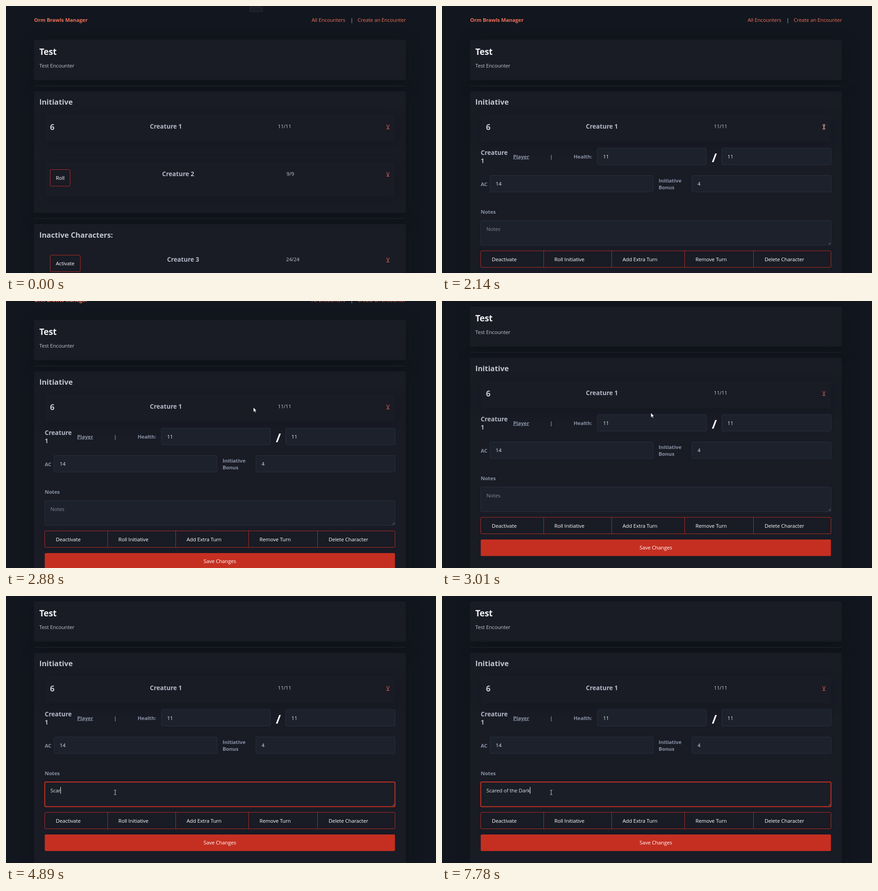
Animation, 949 px wide and 590 px high, one loop 8000 ms. Source, as an HTML page:

```html
<!DOCTYPE html>
<html lang="en">
<head>
<meta charset="utf-8">
<title>Encounter</title>
<style>
  html, body { margin: 0; height: 100%; overflow: hidden; background: #12161e; }
  svg { display: block; width: 949px; height: 590px; }
  text { font: 11.4px "Open Sans", "Noto Sans", sans-serif; letter-spacing: -.01em; fill: #c2c7d0; white-space: pre; }
  .h1, .h2, .h4, .six, .brand, .label, .slash { font-weight: 700; }
  .h1 { font-size: 19.2px; fill: #f0f1f3; }
  .h2 { font-size: 16.3px; letter-spacing: 0; }
  .h4 { font-size: 13.6px; letter-spacing: 0; fill: #b4b9c7; }
  .six { font-size: 17.6px; }
  .brand, .link { fill: #f1705a; }
  .label { fill: #8891a4; }
  .slash { font-size: 27px; fill: #fff; }
  .value { fill: #e0e3e7; }
  .white { fill: #fff; }
  .hint { fill: #838a9c; }
  .under { text-decoration: underline; text-underline-offset: 2px; }
  .mid { text-anchor: middle; }
  .card { fill: #191b25; filter: drop-shadow(3px 7px 16px rgba(7, 8, 12, .28)); }
  .inner { fill: #191b25; filter: drop-shadow(2px 6px 12px rgba(7, 8, 12, .18)); }
  .rule { fill: #202632; }
  .field { fill: #1c212c; stroke: #2a3140; }
  .focus { fill: #1a1e27; stroke: #c52f21; stroke-width: 2; }
  .outline { fill: none; stroke: #b32d22; }
  .save { fill: #c52f21; }
</style>
</head>
<body>
<svg viewBox="0 0 949 590">
  <g id="page"></g>
  <g id="tab"><rect x="537" width="30.5" height="14" fill="#1d2028"/><rect x="541" y="5" width="22" height="4" fill="#191c24"/></g>
  <path id="arrow" d="M0 0V10.3L2.4 8.2 4 11.8 5.6 11.1 4.1 7.6H7.2Z" fill="#fff" stroke="#0b0d12" stroke-width=".6"/>
  <path id="beam" d="M-2.5 -5H-.5L0 -4.5.5 -5H2.5M0 -4.5V4.5M-2.5 5H-.5L0 4.5.5 5H2.5" fill="none" stroke="#d5d8df"/>
</svg>
<script>
const $ = id => document.getElementById(id);
const text = (x, y, str, cls = '') => `<text x="${x}" y="${y}" class="${cls}">${str}</text>`;
const rect = (x, y, x2, y2, cls, r = 2.5) =>
  `<rect x="${x}" y="${y}" width="${x2 - x}" height="${y2 - y}" rx="${r}" class="${cls}"/>`;
const rule = y => rect(62, y, 882.5, y + 1, 'rule', 0);
const group = (id, ...parts) => `<g id="${id}">${parts.join('')}</g>`;
const row = (y, nameX, name, hpX, hp) =>
  text(nameX, y + 5, name, 'h4') + text(hpX, y + 4, hp) + text(839.5, y + 4, 'V', 'link under');
const button = (y, x2, label) => rect(97.5, y, x2, y + 36.5, 'outline') + text(110, y + 22.5, label, 'white');
const field = (x, y, x2, value) => rect(x, y, x2, y + 36.5, 'field') + text(x + 12.5, y + 22.5, value, 'value');
const action = ([x, label]) => text(x, 563.5, label, 'white');

const first = rect(85.5, 240, 858.5, 300, 'inner') + text(97, 274, '6', 'six') +
  row(266, 317.5, 'Creature 1', 600, '11/11');

$('page').innerHTML = [
  text(62, 34.5, 'Orm Brawls Manager', 'brand'),
  text(674.5, 34.5, 'All Encounters', 'link'),
  text(760, 34.5, '|'),
  text(776, 34.5, 'Create an Encounter', 'link'),
  rect(62, 75, 882.5, 164, 'card'),
  text(73.5, 107.5, 'Test', 'h1'),
  text(73.5, 136, 'Test Encounter'),
  rule(176),
  group('closed',
    rect(62, 188.5, 882.5, 457.5, 'card'),
    rect(85.5, 345, 858.5, 421, 'inner'),
    first,
    button(361.5, 141.5, 'Roll'),
    row(370.5, 344.5, 'Creature 2', 619, '9/9'),
    rule(469),
    rect(62, 482, 882.5, 720, 'card'),
    text(73.5, 511.5, 'Inactive Characters:', 'h2'),
    button(550.5, 164, 'Activate'),
    row(560, 355.5, 'Creature 3', 618, '24/24')),
  group('open',
    rect(62, 188.5, 882.5, 800, 'card'),
    first,
    text(85.5, 329, 'Creature', 'h4'), text(85.5, 346.5, '1', 'h4'),
    text(157, 336.5, 'Player', 'label under'),
    text(238, 336.5, '|', 'label'),
    text(290.5, 336.5, 'Health:', 'label'),
    field(343, 314, 583.5, '11'),
    text(595.5, 344.5, '/', 'slash'),
    field(617.5, 314, 858.5, '11'),
    text(85.5, 397.5, 'AC', 'label'),
    field(106, 374.5, 466, '14'),
    text(478, 390, 'Initiative', 'label'), text(478, 405, 'Bonus', 'label'),
    field(551.5, 374.5, 858.5, '4'),
    text(85.5, 459, 'Notes', 'label'),
    '<rect id="notes" x="85.5" y="474" width="773" height="54.5" rx="2.5"/>',
    '<path d="M853 527L857.5 522.5M856 527L857.5 525.5" stroke="#8891a4" stroke-width=".8"/>',
    '<text id="typed" x="98" y="497"></text>',
    '<rect id="caret" y="485" width="1" height="15" fill="#fff"/>',
    rect(85.5, 541, 858.5, 577.5, 'outline'),
    '<path class="outline" d="M224.5 541v36.5M374.5 541v36.5M535.5 541v36.5M687.5 541v36.5"/>',
    [[110, 'Deactivate'], [248, 'Roll Initiative'], [398.5, 'Add Extra Turn'],
      [559.5, 'Remove Turn'], [712, 'Delete Character']].map(action).join(''),
    rect(85.5, 590, 858.5, 626.5, 'save'),
    text(472, 612, 'Save Changes', 'white mid'))
].join('') ;
for (const id of ['closed', 'open'])
  $(id).insertAdjacentHTML('beforeend', text(73.5, 217.5, 'Initiative', 'h2'));

const LOOP = 8000, OPEN = 1940, FOCUS = 3740;
const note = 'Scared of the Dark';
const keyTimes = [4010, 4410, 4550, 4890, 5020, 5220, 5420, 5820, 5950,
  6160, 6360, 6490, 6630, 6760, 7100, 7360, 7440, 7780];
const track = [ // time, x, y
  [530, 530, -6], [730, 530, -9], [731, 530, -40], [1069, 674, -40],
  [1070, 674, 5], [1270, 745, 110], [1470, 820, 225], [1670, 850, 275], [1800, 850, 275],
  [1870, 843, 267], [2410, 843, 267], [2880, 547, 235], [3010, 462, 246],
  [3210, 330, 397], [3480, 252, 428], [3700, 240, 432], [4550, 240, 432], [4680, 241, 433.5]];
// areas where the pointer turns into a text beam, in page coordinates
const beamAreas = [[837, 258, 849, 274], [343, 314, 584, 351], [106, 374, 466, 411], [86, 474, 859, 529]];

function pointerAt(t) {
  if (t < track[0][0]) return [0, -40];
  const i = track.findIndex(k => k[0] > t);
  if (i < 0) return track.at(-1).slice(1);
  const [t0, x0, y0] = track[i - 1], [t1, x1, y1] = track[i], p = (t - t0) / (t1 - t0);
  return [x0 + (x1 - x0) * p, y0 + (y1 - y0) * p];
}

function scrollAt(t) {
  const p = Math.min(1, Math.max(0, (t - 2750) / 255));
  return Math.round(63 * p * p * (3 - 2 * p));
}

const show = (id, on) => $(id).setAttribute('visibility', on ? 'visible' : 'hidden');

function draw(t) {
  const scroll = scrollAt(t), opened = t >= OPEN, focused = t >= FOCUS;
  $('page').setAttribute('transform', `translate(0 ${-scroll})`);
  show('closed', !opened);
  show('open', opened);
  $('tab').setAttribute('opacity', Math.min(1, Math.max(0, (730 - t) / 200)));

  const count = keyTimes.filter(k => k <= t).length, typed = $('typed');
  typed.textContent = count ? note.slice(0, count) : 'Notes';
  typed.setAttribute('class', count ? 'value' : 'hint');
  $('notes').setAttribute('class', focused ? 'focus' : 'field');
  show('caret', focused);
  $('caret').setAttribute('x', Math.round(98 + (count && typed.getComputedTextLength())));

  const [x, y] = pointerAt(t);
  const isBeam = t >= 1800 && beamAreas.some(([l, top, r, b]) =>
    x >= l && x <= r && y + scroll >= top && y + scroll <= b);
  show('arrow', !isBeam);
  show('beam', isBeam);
  $(isBeam ? 'beam' : 'arrow').setAttribute('transform', `translate(${Math.round(x)} ${Math.round(y)})`);
}

const start = performance.now();
(function tick() {
  draw((performance.now() - start) % LOOP);
  requestAnimationFrame(tick);
})();
</script>
</body>
</html>
```
